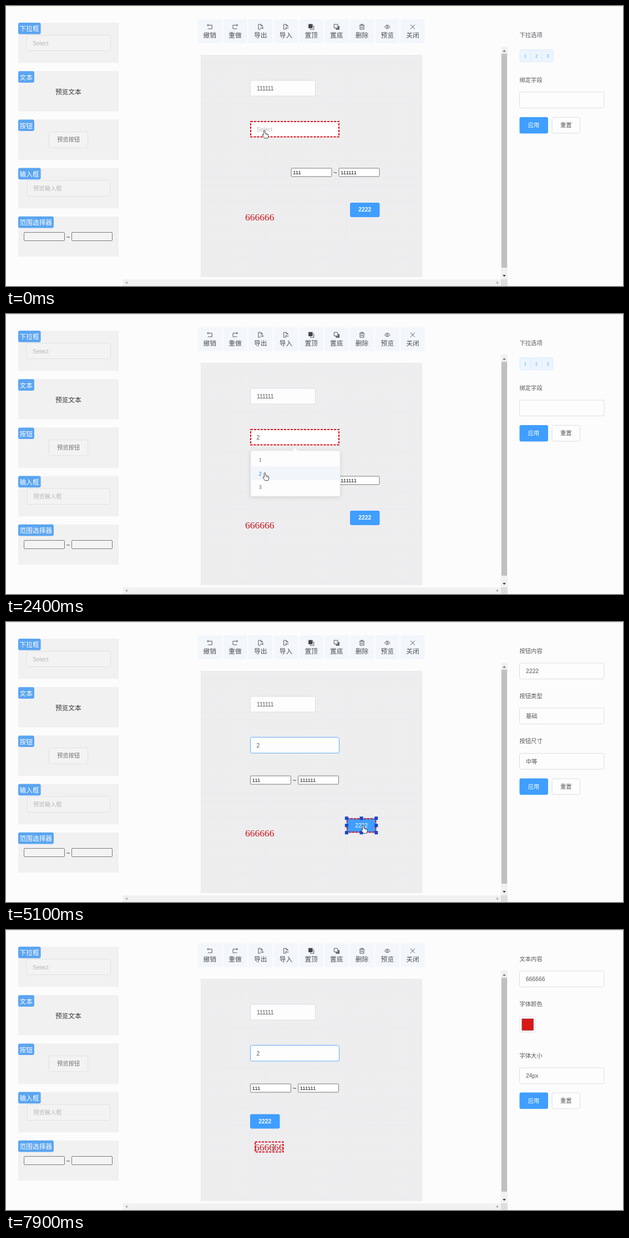
Recreate the animation shown at these times as an HTML page. Size 1112 by 504 pixels, loop 8000 ms.

```html
<!DOCTYPE html>
<html lang="zh">
<head>
<meta charset="utf-8">
<style>
html, body { margin: 0; width: 100%; height: 100%; overflow: hidden; background: #fcfcfc; }
svg { display: block; font-family: "Liberation Sans", "Noto Sans CJK SC", "Noto Sans CJK", sans-serif; }
.serif { font-family: "Liberation Serif", serif; }
</style>
</head>
<body>
<svg id="stage" width="1112" height="504" viewBox="0 0 1112 504">
  <defs>
    <pattern id="grid" x="351" y="88" width="14.6" height="14.6" patternUnits="userSpaceOnUse">
      <path d="M0 .5H14.6M.5 0V14.6" stroke="#eaeaf3"/>
    </pattern>
    <filter id="shadow" x="-20%" y="-20%" width="140%" height="150%">
      <feDropShadow dx="0" dy="1.5" stdDeviation="3.5" flood-opacity=".13"/>
    </filter>
  </defs>
  <g id="base"></g>
  <g id="live"></g>
</svg>
<script>
const LOOP = 8000, STEP = 100;
const BLUE = '#409eff', RED = '#e00a1a', LINE = '#dcdfe6', INK = '#55575b', FADED = '#b4b6bb';
const SMALL = 10.3, LARGE = 11.7;

const rect = (x, y, w, h, fill, extra = '') =>
  `<rect x="${x}" y="${y}" width="${w}" height="${h}" fill="${fill}" ${extra}/>`;
const frame = (x, y, w, h, fill, stroke, r = 3) =>
  rect(x + .5, y + .5, w - 1, h - 1, fill, `stroke="${stroke}" rx="${r}"`);
const dashed = (x, y, w, h, fill = 'none') =>
  rect(x + 1, y + 1, w - 2, h - 2, fill, `stroke="${RED}" stroke-width="2" stroke-dasharray="4 2"`);
const text = (x, y, s, size = SMALL, fill = INK, extra = '') =>
  `<text x="${x}" y="${y + size * .37}" font-size="${size}" fill="${fill}" ${extra}>${s}</text>`;
const mid = (x, y, s, size, fill, extra = '') => text(x, y, s, size, fill, 'text-anchor="middle" ' + extra);
const path = (d, fill = 'none', stroke = 'none', extra = '') =>
  `<path d="${d}" fill="${fill}" stroke="${stroke}" ${extra}/>`;
const at = (x, y, s) => `<g transform="translate(${x} ${y})">${s}</g>`;

// Two small native inputs joined by a tilde
const range = (x, y, a = '', b = '', fill = '#fff') => at(x, y,
  frame(0, 0, 74, 16, fill, '#7b7b7b', 1.5) + frame(86, 0, 74, 16, fill, '#7b7b7b', 1.5) +
  mid(80, 8.5, '~', LARGE, '#333') + text(3.5, 8, a, 9.75, '#111') + text(89.5, 8, b, 9.75, '#111'));

const PAGE = 'M0 4.5H-3.8V-4.5H.8L3.8-1.5V-.5M.8-4.5V-1.5H3.8';
const TOOLS = [
  ['撤销', 'M-2.5-5l-2 2 2 2M-4.5-3H4V3.5H-3.5'],
  ['重做', 'M2.5-5l2 2-2 2M4.5-3H-4V3.5H3.5'],
  ['导出', PAGE + 'M-.5 2.2H5M3.2.4L5 2.2 3.2 4'],
  ['导入', PAGE + 'M5 2.2H-.5M1.3.4L-.5 2.2 1.3 4'],
  ['置顶', 'M3-1.5H4.8V4.8H-1.5V3', 'M-5-5H2.5V2.5H-5z'],
  ['置底', 'M-4.5-4.5H2V2H-4.5z', 'M3-1.5H5V5H-1.5V3H3z'],
  ['删除', 'M-4.5-3H4.5M-1.5-3V-4.7H1.5V-3M-3.5-3V4.5H3.5V-3M-1.2-1V2.5M1.2-1V2.5'],
  ['预览', 'M-5 0Q0-6.5 5 0Q0 6.5-5 0zM-1.5 0a1.5 1.5 0 1 0 3 0a1.5 1.5 0 1 0-3 0'],
  ['关闭', 'M-4-4L4 4M4-4L-4 4']
];

function drawBase() {
  let s = '';
  ['下拉框', '文本', '按钮', '输入框', '范围选择器'].forEach((name, i) => {
    const y = 30 + i * 87.2;
    s += rect(22, y, 181, 72.5, '#f1f1f1') +
      rect(22, y, name.length * LARGE + 5.5, 20.7, '#5ba5f1', 'rx="3"') +
      text(24.6, y + 11, name, LARGE, '#fff');
  });
  s += frame(36.5, 52, 152.5, 29, '#f3f3f3', '#e0e1e4') + text(48, 67, 'Select', SMALL, FADED);
  s += mid(112.3, 154.5, '预览文本', LARGE, '#333');
  s += frame(77, 226, 71, 29.5, '#f3f3f3', '#e0e1e4') + mid(112.5, 240.5, '预览按钮', SMALL, '#707276');
  s += frame(37.5, 313.5, 150.5, 29.5, '#f3f3f3', '#e0e1e4') + text(49, 328, '预览输入框', SMALL, FADED);
  s += range(32, 407, '', '', '#f4f4f4');

  TOOLS.forEach(([name, line, solid = ''], i) => {
    const x = 367.3 + i * 45.7;
    s += rect(x - 21.6, 24, 43.2, 43, '#f3f6fa', 'rx="2"') +
      at(x, 37.5, path(solid, '#444') + path(line, 'none', '#55575b')) + mid(x, 52.5, name, LARGE, '#4c4e52');
  });

  s += rect(351, 88, 399.5, 400, '#eeeeee') + rect(351, 88, 399.5, 400, 'url(#grid)');
  s += rect(892, 73, 12, 419, '#f1f1f1') + rect(893, 86, 10, 385, '#c0c0c2') +
    path('M895 82.5h6l-3-3.5z', '#777') + path('M895 484h6l-3 3.5z', '#444');
  s += rect(210, 492, 682, 12, '#f1f1f1') + rect(892, 492, 12, 12, '#dedede') +
    path('M218.5 495.5v5l-3-2.5z', '#999') + path('M884.5 495.5v5l3-2.5z', '#999');
  return s;
}

const field = (y, label, value) => text(925.5, y, label) +
  frame(925, y + 21.5, 153.5, 29.5, '#fdfdfd', LINE) + text(937, y + 36.5, value);
const actions = y => rect(925.5, y, 51.5, 29.5, BLUE, 'rx="3"') +
  mid(951, y + 14.5, '应用', SMALL, '#fff', 'font-weight="500"') +
  frame(983.5, y, 51.5, 29.5, '#fdfdfd', LINE) + mid(1009.3, y + 14.5, '重置');

const PANELS = {
  select: () => text(925.5, 52, '下拉选项') + [1, 2, 3].map((n, i) =>
    frame(925.5 + i * 20.3, 78, 20.5, 23, '#ecf5ff', '#dcecfc', 2) +
    mid(935.8 + i * 20.3, 89.5, n, 9, BLUE, 'class="serif"')).join('') +
    field(133, '绑定字段', '') + actions(200),
  range: () => field(52, '开始范围字段', '11') + field(133, '结束范围字段', '22') + actions(200),
  button: () => field(52, '按钮内容', '2222') + field(133, '按钮类型', '基础') +
    field(214.5, '按钮尺寸', '中等') + actions(281.5),
  text: () => field(52, '文本内容', '666666') + text(925.5, 133, '字体颜色') +
    frame(925.5, 155, 29.5, 29.5, '#fdfdfd', '#e4e6eb') + frame(929, 159, 22.5, 22.5, '#d91618', '#a9a9a9', 1) +
    field(226, '字体大小', '24px') + actions(292.5)
};

// Piecewise eased track of [time, x, y] stops
function track(stops, t) {
  const i = stops.findIndex(k => k[0] > t);
  if (i === 0) return stops[0].slice(1);
  if (i < 0) return stops[stops.length - 1].slice(1);
  const [t0, x0, y0] = stops[i - 1], [t1, x1, y1] = stops[i];
  let p = (t - t0) / (t1 - t0);
  p = p * p * (3 - 2 * p);
  return [x0 + (x1 - x0) * p, y0 + (y1 - y0) * p];
}

const POINTER = [
  [0, 465.5, 224], [700, 465.5, 224], [950, 464, 261], [1100, 464, 261], [1400, 475.5, 218.5],
  [1650, 475.5, 218.5], [2000, 465, 285], [2600, 467, 286], [2900, 478, 291], [3400, 527, 311], [3600, 545.5, 308],
  [3700, 545.5, 308], [4300, 472, 293], [4600, 472, 293], [4950, 650, 367], [5050, 650, 367],
  [5500, 470, 344.5], [5600, 470, 344.5], [5800, 450.5, 381], [6100, 465, 381], [6400, 465, 381],
  [6900, 474, 389], [7300, 474, 389], [7900, 482, 391.5]
];
const MOVES = {
  range: [[3700, 513.5, 291.5], [4300, 440, 276.5]],
  button: [[5050, 620, 354], [5500, 440, 331.5]],
  text: [[6400, 431, 369.5], [6900, 440, 388], [7300, 440, 388], [7900, 448, 380.5]]
};
const DRAGS = [[3700, 4600, 'range'], [5050, 5600, 'button'], [6400, 8000, 'text']];

const ARROW = path('M0 0V9.5L2.2 7.5 3.8 11 5.3 10.3 3.8 7H6.6z', '#fff', '#333', 'stroke-width=".9"');
const HAND = path('M-1.2 8.5V1A1.2 1.2 0 0 1 1.2 1V5L5.5 6Q7.3 6.5 7.3 8.5V10.5Q7 12.5 6 14H.3Q-1.3 11.3-3.6 9Q-3.8 7.3-2.3 7.5z',
  '#fff', '#333', 'stroke-width=".9" stroke-linejoin="round"') + path('M3 6V8.5M5 6.5V9', 'none', '#555', 'stroke-width=".7"');
const BEAM = path('M-2-5.5H-.5L0-5 .5-5.5H2M0-5V5M-2 5.5H-.5L0 5 .5 5.5H2', 'none', '#444', 'stroke-width=".9"');

function pointer(t) {
  const [x, y] = track(POINTER, t);
  const shape = t >= 5700 ? BEAM : t < 2800 || t >= 4900 && t < 5600 ? HAND : ARROW;
  return at(x, y, shape);
}

const clamp = v => Math.max(0, Math.min(1, v));
const ramp = (t, from) => clamp((t - from) / 200);
const menuOpen = t => ramp(t, 300) - ramp(t, 1100) + ramp(t, 1400) - ramp(t, 2400);

function menu(t, value) {
  const k = menuOpen(t);
  if (k <= 0) return '';
  const hover = t < 800 ? 0 : t < 1850 ? 1 : 2;
  let s = frame(440.5, 245.5, 162, 83, '#fdfdfd', '#e6e8ec') .replace('/>', ' filter="url(#shadow)"/>') +
    path('M516.5 246L521 241.5 525.5 246z', '#fdfdfd');
  for (let n = 1; n <= 3; n++) {
    const y = 262.3 + (n - 1) * 24.5, on = n === value;
    if (n === hover) s += rect(441, y - 12.3, 161, 24.5, '#f2f5fa');
    s += text(455.5, y, n, SMALL, on ? BLUE : INK, `class="serif" font-weight="${on ? 700 : 400}"`);
  }
  return `<g opacity="${k}" transform="translate(0 245) scale(1 ${k}) translate(0 -245)">${s}</g>`;
}

function drawLive(t) {
  const picked = t < 3600 ? 'select' : t < 5000 ? 'range' : t < 6100 ? 'button' : 'text';
  const value = t < 1100 ? 0 : t < 2400 ? 1 : 2;
  const [rx, ry] = track(MOVES.range, t), [bx, by] = track(MOVES.button, t), [tx, ty] = track(MOVES.text, t);
  const drag = DRAGS.find(d => t >= d[0] && t < d[1]);
  let s = rect(0, 0, 1112, 1.5, t < STEP ? '#f3f4e4' : '#ebebeb') + PANELS[picked]();

  if (drag && Math.abs(track(MOVES[drag[2]], t)[0] - 440) < 1)
    s += path('M440.5 88V488', 'none', RED, 'stroke-dasharray="2.2 1.5"');

  s += frame(440, 133.5, 118, 29, '#fdfdfd', LINE) + text(452, 148, '111111');

  s += picked === 'select' ? dashed(440, 207, 161, 29.5, '#fff') : frame(440, 207, 161, 29.5, '#fdfdfd', '#64aef5');
  s += text(451.5, 222, value || 'Select', SMALL, value ? INK : FADED);

  s += range(rx, ry, '111', '111111');
  if (picked === 'range') s += dashed(rx, ry - 3, 160, 22);

  const active = picked === 'button';
  s += rect(bx, by, 53.5, 26, BLUE, `rx="${active ? 0 : 3}"`) +
    mid(bx + 26.8, by + 12.5, '2222', SMALL, '#fff', `font-weight="${active ? 400 : 700}"`);
  if (active) {
    s += dashed(bx, by, 53.5, 26);
    for (let i = 0; i < 9; i++)
      if (i !== 4) s += rect(bx + (i % 3) * 26.7 - 3, by + Math.floor(i / 3) * 13 - 3, 6, 6, '#1846cc');
  }

  s += text(tx, ty + 10, '666666', 17.5, '#c8161c', 'class="serif"');
  if (picked === 'text') s += dashed(tx, ty, 52.5, 20);

  return s + menu(t, value) + pointer(t);
}

const live = document.getElementById('live');
document.getElementById('base').innerHTML = drawBase();
const start = performance.now();
let shown = -1;
function tick() {
  const t = Math.floor((performance.now() - start) % LOOP / STEP) * STEP;
  if (t !== shown) live.innerHTML = drawLive(shown = t);
  requestAnimationFrame(tick);
}
tick();
</script>
</body>
</html>
```
